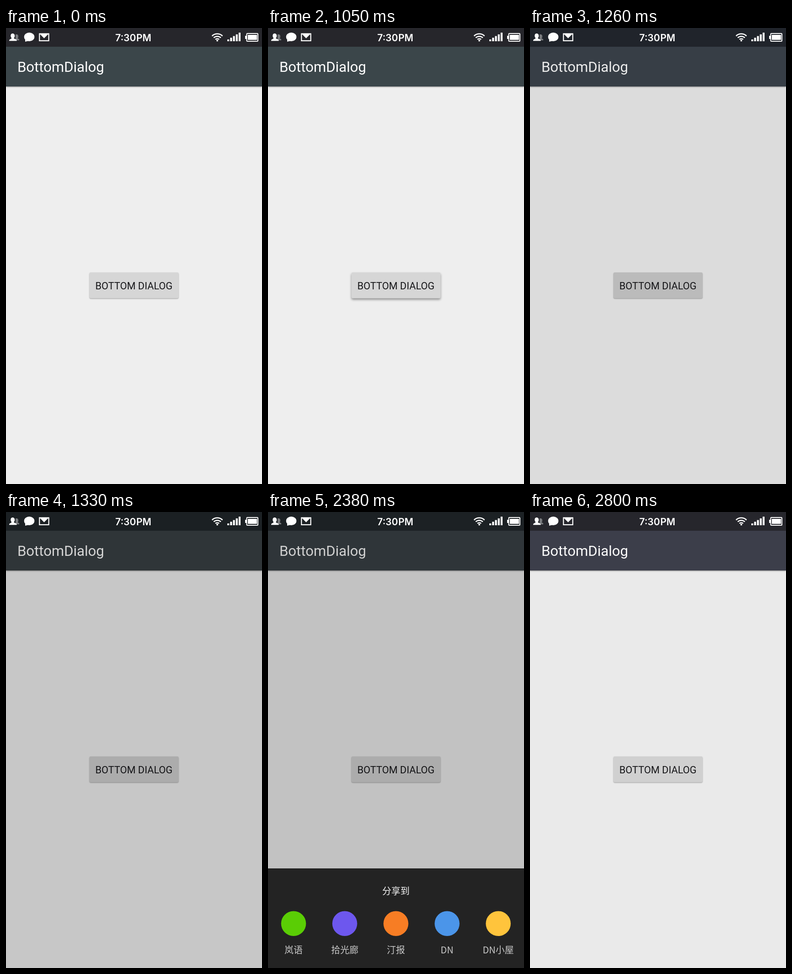
An HTML page that plays this animation: 561x998 px, repeating every 4.34 s.

```html
<!DOCTYPE html>
<html lang="zh-CN">
<head>
<meta charset="utf-8">
<title>BottomDialog</title>
<style>
  html, body { margin: 0; width: 100%; height: 100%; overflow: hidden; background: #eee; }
  svg { display: block; width: 100vw; height: 100vh; }
  .ui { font-family: Roboto, sans-serif; }
  .clock { font: 600 21px Inter, sans-serif; fill: #fff; }
  #sheet { font: 20px "Noto Sans CJK SC", "Noto Sans CJK", sans-serif; text-anchor: middle; }
  #bar { filter: drop-shadow(0 1.5px 1.5px rgba(0, 0, 0, .4)); }
</style>
</head>
<body>
<svg viewBox="0 0 561 998" preserveAspectRatio="none">
  <rect width="561" height="998" fill="#eee"/>

  <g class="ui">
    <rect id="bar" y="30" width="561" height="98"/>
    <text x="24.9" y="96" font-size="31.17" fill="#fff">BottomDialog</text>
    <rect id="button" x="183" y="535" width="195" height="56.5" rx="3"/>
    <text x="280.3" y="571.5" font-size="21.8" fill="#17171a" text-anchor="middle">BOTTOM DIALOG</text>
  </g>

  <rect id="dim" y="41" width="561" height="957"/>

  <g id="sheet">
    <rect y="780" width="561" height="218" fill="#232323"/>
    <text x="280.3" y="837" fill="#f4f4f4">分享到</text>
  </g>

  <rect id="status" width="561" height="41"/>
  <g fill="#fff">
    <!-- contacts -->
    <path fill="#77797c" d="M23 14c3 0 4 2 4 4.500s-1 3-1 4.500l3 1.500v2.500h-8V14z"/>
    <path d="M14.500 12c3.200 0 4.700 2.300 4.700 5.500 0 2-1 3-1.600 4.200v1.300l4.900 2.200c.8.500 1 1.500 1 3H7c0-1.500.2-2.500 1-3l4-2.200v-1.300c-.8-1.200-1.700-2.200-1.700-4.200 0-3.200 1.200-5.500 4.200-5.500z"/>
    <!-- message -->
    <ellipse cx="51" cy="19.500" rx="11.300" ry="9.500"/>
    <path d="M42 23v7l8-2z"/>
    <!-- mail -->
    <path fill="none" stroke="#fff" stroke-width="2.200" d="M73.300 12.600h20.400v15.300H73.300z"/>
    <path d="M73 12h21l-10.500 10.500z"/>
    <!-- wifi -->
    <g fill="none" stroke="#fff" stroke-width="2.500">
      <path d="M451.500 17.500a16.500 16.500 0 0 1 23 0M455.200 21.300a11.200 11.200 0 0 1 15.600 0M458.900 25a6 6 0 0 1 8.200 0"/>
    </g>
    <circle cx="463" cy="27.500" r="2"/>
    <g id="signal"></g>
    <!-- battery -->
    <path d="M524 17h3v7h-3zM530 15h20v11h-20z"/>
    <rect x="527.500" y="12" width="24.500" height="17" rx="1.500" fill="none" stroke="#fff" stroke-width="2"/>
  </g>
  <text class="clock" x="239.500" y="28.500">7:30</text>
  <text class="clock" x="318.500" y="28.500" text-anchor="end">PM</text>
</svg>

<script>
const LOOP = 4340;
const SHEET_H = 218;
const $ = id => document.getElementById(id);

function add(parent, tag, attrs, text = '') {
  const el = document.createElementNS(parent.namespaceURI, tag);
  for (const key in attrs) el.setAttribute(key, attrs[key]);
  el.textContent = text;
  parent.append(el);
}

for (let i = 0; i < 5; i++) {
  const height = 4 + i * 3.7;
  add($('signal'), 'rect', { x: 485 + i * 6.2, y: 29 - height, width: 4.2, height });
}

[
  ['岚语', '#5acd05'],
  ['拾光廊', '#6d57ee'],
  ['汀报', '#f77d24'],
  ['DN', '#4b95e9'],
  ['DN小屋', '#ffc43c']
].forEach(([label, fill], i) => {
  const x = 56 + i * 112.15;
  add($('sheet'), 'circle', { cx: x, cy: 900.7, r: 27.3, fill });
  add($('sheet'), 'text', { x, y: 965.5, fill: '#c8c8c8' }, label);
});

// start ms, dim, share of sheet shown, button lift, bar, button, status bar
const steps = [
  [0,    0,    0,   0, '#3b464a', '#d6d6d6', '#26262b'],
  [1050, 0,    0,   1, '#3b464a', '#d6d6d6', '#26262b'],
  [1190, .017, 0,   1, '#3b454b', '#cecece', '#25262b'],
  [1260, .075, 0,   0, '#3b434c', '#cacaca', '#20242b'],
  [1330, .165, 0,   0, '#383f43', '#cecece', '#1b2023'],
  [1400, .185, .65, 0, '#3a4146', '#d3d3d3', '#1c2124'],
  [1470, .185, 1,   0, '#3a4146', '#d3d3d3', '#1c2124'],
  [2730, .1,   .5,  0, '#3b4249', '#d3d3d3', '#20242a'],
  [2800, .017, 0,   0, '#3d3f4b', '#d3d3d3', '#26262c']
];

function draw(t) {
  const [, dim, shown, lift, bar, button, status] = steps.findLast(s => s[0] <= t);
  $('dim').style.opacity = dim;
  $('sheet').setAttribute('transform', `translate(0 ${(1 - shown) * SHEET_H})`);
  $('bar').style.fill = bar;
  $('button').style.fill = button;
  $('button').style.filter = lift
    ? 'drop-shadow(0 3px 2.5px rgba(0,0,0,.4))'
    : 'drop-shadow(0 1.3px 1.1px rgba(0,0,0,.35))';
  $('status').style.fill = status;
}

const start = performance.now();
function tick() {
  draw((performance.now() - start) % LOOP);
  requestAnimationFrame(tick);
}
tick();
</script>
</body>
</html>
```
